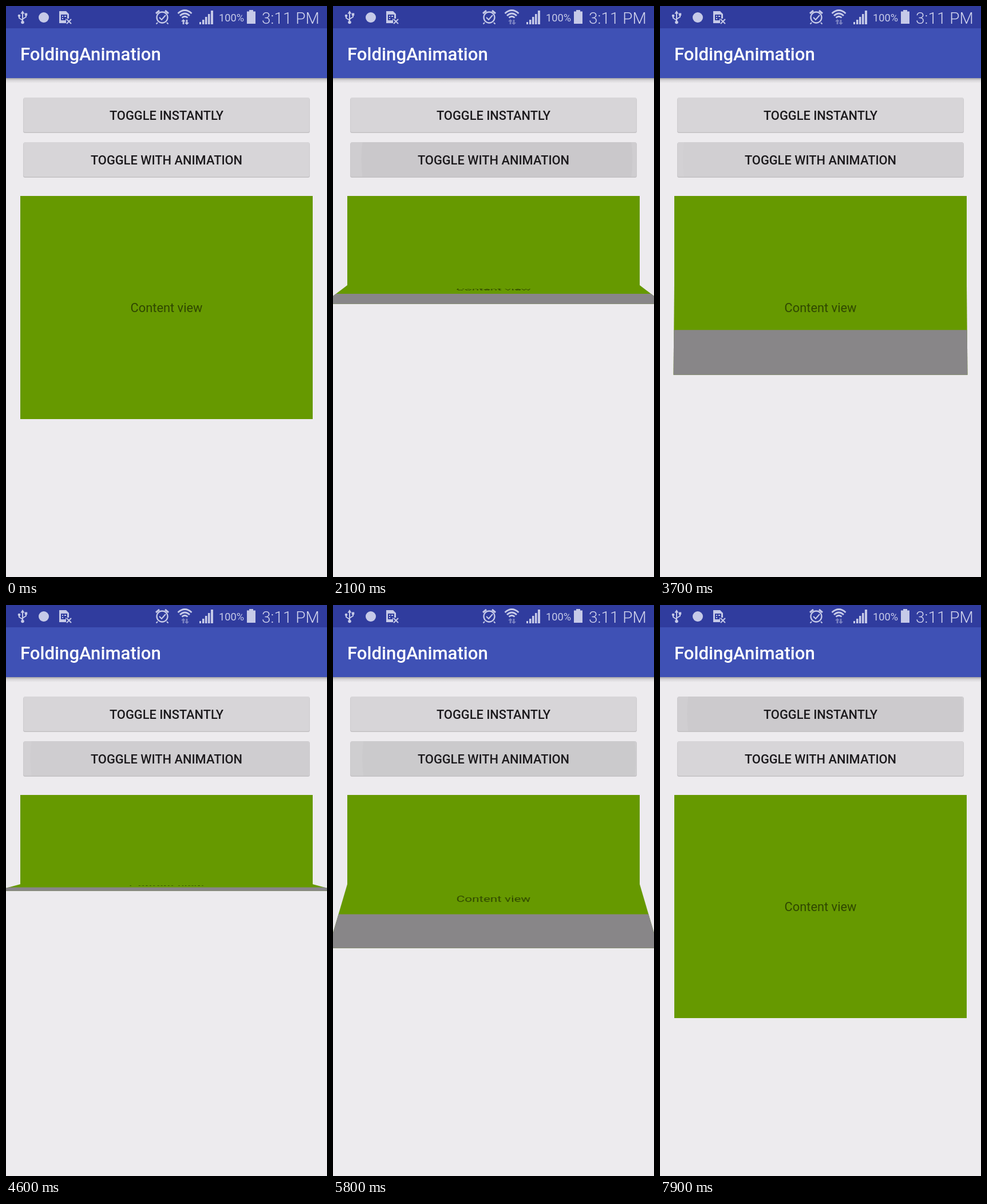
Write an HTML page that moves like this. It is 561 by 998 pixels and loops after 8000 ms.

```html
<!DOCTYPE html>
<html lang="en">
<head>
<meta charset="utf-8">
<title>FoldingAnimation</title>
<style>
  html, body { margin: 0; width: 100%; height: 100%; overflow: hidden; background: #edebee; }
  body { position: relative; font-family: Roboto, sans-serif; }
  #screen { position: absolute; inset: 0; width: 561px; height: 998px; overflow: hidden; }
  svg { position: absolute; left: 0; top: 0; }
  .view { position: absolute; left: 25px; width: 511px; height: 156px; text-align: center;
          font-size: 21.82px; color: rgba(0, 0, 0, .54); }
  .view span { position: absolute; left: 0; right: 0; line-height: 26px; }
  .green { background: #669900; }
  #top { top: 332px; }
  #mid { top: 488px; transform-origin: 50% 0; }
  #mid span { top: 27px; }
  #end { left: 0; top: 156px; height: 77.5px; transform-origin: 50% 0; }
  #title { top: 332px; background: #0097ce; transform-origin: 50% 100%; }
  #title span { top: 66px; }
</style>
</head>
<body>
<div id="screen">
  <svg width="561" height="998" viewBox="0 0 561 998" font-family="Roboto, sans-serif">
    <defs>
      <linearGradient id="shade" x2="0" y2="1">
        <stop stop-color="#000" stop-opacity=".3"/>
        <stop offset=".4" stop-color="#000" stop-opacity=".1"/>
        <stop offset="1" stop-color="#000" stop-opacity="0"/>
      </linearGradient>
      <clipPath id="clip0"><rect x="30.5" y="160" width="500" height="60.5" rx="3"/></clipPath>
      <clipPath id="clip1"><rect x="30.5" y="238" width="500" height="60.5" rx="3"/></clipPath>
    </defs>

    <rect y="126" width="561" height="9" fill="url(#shade)"/>
    <rect width="561" height="126" fill="#3f51b5"/>
    <rect width="561" height="39" fill="#303c9e"/>
    <text x="25" y="94.5" font-size="31.17" font-weight="500" fill="#fff">FoldingAnimation</text>

    <g fill="#c6cae8" stroke="none">
      <g fill="none" stroke="#c6cae8" stroke-width="2">
        <path d="M29 12V27M29 25L23 21V17M29 23L35 19V15"/>
        <path d="M265 29L262.500 31.500M281 29L283.500 31.500M268 20L272 24L279 16"/>
        <circle cx="273" cy="20" r="9.500" stroke-width="2.300"/>
        <path d="M262 13L268 8M284 13L278 8" stroke-width="3"/>
        <path d="M300.500 13Q312.500 2 324.500 13M304 17Q312.500 9 321 17M307.500 20.500Q312.500 16 317.500 20.500" stroke-width="2.800"/>
        <path d="M106 23L114 31M114 23L106 31"/>
      </g>
      <path d="M29 8L25.500 13.500H32.500Z"/>
      <circle cx="29" cy="28.500" r="2.800"/>
      <circle cx="23" cy="17" r="2.300"/>
      <rect x="32.800" y="12.500" width="4.400" height="4.400"/>
      <circle cx="66" cy="20" r="9"/>
      <path fill-rule="evenodd" d="M93 9H105L110 14V22H105V30H93ZM96 15V25H104V22H107V15ZM98 17H100V19H98ZM102 17H105V19H102ZM98 21H100V23H98Z"/>
      <path id="data" d="M310 23L306 27H308.700V32H311.300V27H314ZM316 33L312 29H314.700V24H317.300V29H320Z"/>
      <path d="M338 28H341V32H338ZM343 24H346.500V32H343ZM348 19H351.500V32H348ZM353 14H356.500V32H353ZM358 8H362V32H358Z"/>
      <path d="M425 7H432V9.500H436V31H421V9.500H425Z"/>
      <text x="372" y="27" font-size="18.300">100%</text>
      <text x="447" y="31" font-size="28" font-weight="300" fill="#d2d5ee">3:11 PM</text>
    </g>

    <g id="buttons"></g>
  </svg>

  <div id="top" class="view green"></div>
  <div id="mid" class="view green"><span>Content view</span><div id="end" class="view"></div></div>
  <div id="title" class="view"><span>Title view</span></div>

  <svg width="561" height="998" viewBox="0 0 561 998">
    <circle id="touch" r="17.300" fill="#f0eef3" fill-opacity=".92" stroke="#b0b3da" stroke-width="2"/>
  </svg>
</div>
<script>
const LOOP = 8000, STEP = 100, QUARTER = 100, DEPTH = 1060;
const $ = id => document.getElementById(id);
const clamp = (v, a = 0, b = 1) => Math.min(b, Math.max(a, v));

$('buttons').innerHTML = ['TOGGLE INSTANTLY', 'TOGGLE WITH ANIMATION'].map((label, i) => {
  const y = 160 + 78 * i;
  return `<rect x="30" y="${y + .5}" width="501" height="61.5" rx="3.5" fill="#c3c1c4"/>
    <rect x="30.5" y="${y}" width="500" height="60.5" rx="3" fill="#d7d5d8"/>
    <g clip-path="url(#clip${i})">
      <rect id="tint${i}" x="30" y="${y}" width="501" height="61" opacity="0"/>
      <circle id="ripple${i}" opacity="0"/>
    </g>
    <text x="280.5" y="${y + 38.5}" font-size="21.82" font-weight="500" fill="#1b191c"
      text-anchor="middle">${label}</text>`;
}).join('');

// Unfolding is counted in quarter turns: 0 = title only, 4 = fully open.
const moves = [
  { at: 1822, to: 0 }, { at: 3510, to: 4 }, { at: 4313, to: 0 }, { at: 5654, to: 4 },
  { at: 6650, to: 0, instant: true }, { at: 7760, to: 4, instant: true }
];
const presses = [
  { at: 1790, up: 1850, x: 380, y: 275, button: 1 },
  { at: 3300, up: 3460, x: 468, y: 285, button: 1 },
  { at: 4221, up: 4310, x: 468, y: 285, button: 1 },
  { at: 5474, up: 5600, x: 468, y: 285, button: 1 },
  { at: 6200, up: 6660, x: 458, y: 195, button: 0 },
  { at: 7556, up: 7740, x: 458, y: 195, button: 0 }
];

// Each quarter turn eases in and out by itself.
function turns(ms) {
  const q = clamp(ms / QUARTER, 0, 4), n = Math.floor(q);
  return n + (1 - Math.cos(Math.PI * (q - n))) / 2;
}

function openness(t) {
  const m = moves.filter(m => m.at <= t).pop();
  if (!m) return 4;
  const done = m.instant ? 4 : turns(t - m.at);
  return m.to ? done : 4 - done;
}

function tilt(el, deg) {
  el.style.transform = Math.abs(deg) < .01 ? 'none' : `perspective(${DEPTH}px) rotateX(${deg}deg)`;
}

function drawFold(t) {
  const u = openness(t);
  const mid = 180 - 90 * Math.min(u, 2), end = 180 - 90 * Math.max(u - 2, 0);
  const showMid = mid < 90;
  $('mid').style.display = showMid ? 'block' : 'none';
  $('title').style.display = showMid ? 'none' : 'block';
  tilt($('mid'), mid);
  tilt($('title'), mid - 180);
  tilt($('end'), end);
  $('end').style.background = end > 90 ? '#888688' : '#669900';
}

function drawPress(t) {
  const p = presses.filter(p => p.at <= t).pop();
  for (const i of [0, 1]) {
    const on = p && p.button === i, age = on ? t - p.at : 1e4;
    $('tint' + i).setAttribute('opacity', .04 * clamp((500 - age) / 200));
    const ripple = $('ripple' + i);
    ripple.setAttribute('opacity', .06 * clamp(1 - age / 500));
    if (!on) continue;
    const grow = 1 - Math.exp(-age / 110), cy = 190 + 78 * i;
    ripple.setAttribute('cx', p.x + (280.5 - p.x) * grow);
    ripple.setAttribute('cy', p.y + (cy - p.y) * grow);
    ripple.setAttribute('r', 252 * grow);
  }
  const touch = $('touch');
  touch.setAttribute('opacity', p ? clamp((t - p.at + 10) / 70) * clamp(1 - (t - p.up) / 90) : 0);
  if (p) {
    touch.setAttribute('cx', p.x);
    touch.setAttribute('cy', p.y);
  }
}

const start = performance.now();
function frame() {
  const t = Math.floor((performance.now() - start) % LOOP / STEP) * STEP;
  $('data').setAttribute('opacity', t < 400 ? 1 : .5);
  drawFold(t);
  drawPress(t);
  requestAnimationFrame(frame);
}
frame();
</script>
</body>
</html>
```
